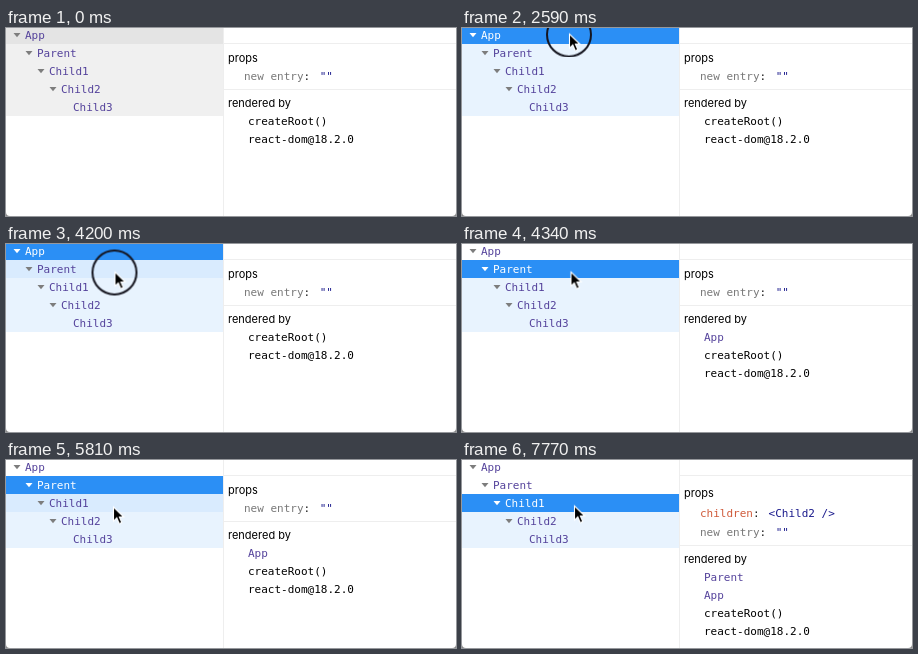
An HTML page for the animation above (8 s loop, 450x188 px).

```html
<!DOCTYPE html>
<html lang="en">
<head>
<meta charset="utf-8">
<title>Component tree inspector</title>
<style>
html, body { margin: 0; width: 100%; height: 100%; overflow: hidden; background: #888; }
svg { display: block; width: 100vw; height: 100vh; }
text { font: 11px "DejaVu Sans Mono", monospace; fill: #000; }
.title { font: 11px Inter, sans-serif; }
.name { fill: #54429b; }
.key { fill: #777; }
.prop { fill: #cf5a3a; }
.colon { fill: #222; }
.value { fill: #1a1a8c; }
.arrow { fill: #7d7d7d; }
.bar rect { fill: #2b8ff5; }
.bar text, .bar .arrow { fill: #fff; }
.line { fill: none; stroke: #eee; }

/* The small negative delay keeps step edges clear of frame boundaries. */
.idle, .sub, .hover, .bar, .panel, .ring, .cursor {
  animation: 8s step-end -10ms infinite;
}
.idle { animation-name: idle; }
.sub { fill: #e8f3fe; animation-name: sub; }
.hover { fill: #d9ebfe; animation-name: hover; }
.bar.app { animation-name: bar-app; }
.bar.parent { animation-name: bar-parent; }
.bar.child { animation-name: bar-child; }
.panel.app { animation-name: panel-app; }
.panel.parent { animation-name: panel-parent; }
.panel.child { animation-name: panel-child; }
.ring { fill: none; stroke: #15151f; stroke-width: 2; animation-name: ring; }
.cursor { animation-name: cursor; }

@keyframes idle { 0% { visibility: visible; } 14%, 100% { visibility: hidden; } }
@keyframes sub {
  0% { visibility: hidden; transform: translateY(0); }
  14% { visibility: visible; transform: translateY(0); }
  53.375% { visibility: visible; transform: translateY(18px); }
  78.75%, 100% { visibility: visible; transform: translateY(36px); }
}
@keyframes hover {
  0% { visibility: hidden; transform: translateY(0); }
  42.875% { visibility: visible; transform: translateY(0); }
  53.375% { visibility: hidden; transform: translateY(18px); }
  64.75% { visibility: visible; transform: translateY(18px); }
  78.75%, 100% { visibility: hidden; transform: translateY(18px); }
}
@keyframes bar-app {
  0% { visibility: hidden; } 14% { visibility: visible; } 53.375%, 100% { visibility: hidden; }
}
@keyframes bar-parent {
  0% { visibility: hidden; } 53.375% { visibility: visible; } 78.75%, 100% { visibility: hidden; }
}
@keyframes bar-child { 0% { visibility: hidden; } 78.75%, 100% { visibility: visible; } }
@keyframes panel-app { 0% { visibility: visible; } 53.375%, 100% { visibility: hidden; } }
@keyframes panel-parent {
  0% { visibility: hidden; } 53.375% { visibility: visible; } 80.5%, 100% { visibility: hidden; }
}
@keyframes panel-child { 0% { visibility: hidden; } 96.25%, 100% { visibility: visible; } }
@keyframes ring {
  0%, 14.875%, 34.125%, 54.25%, 79.625%, 100% { visibility: hidden; }
  14%, 32.375%, 52.5%, 77.875% { visibility: visible; }
}
@keyframes cursor {
  0% { transform: translate(83px, 200px); animation-timing-function: steps(4); }
  3.5% { transform: translate(88px, 110px); animation-timing-function: steps(4); }
  7% { transform: translate(106px, 25px); animation-timing-function: steps(3); }
  9.625% { transform: translate(109px, 6px); }
  11.375% { transform: translate(109px, 6px); animation-timing-function: steps(2); }
  13.125% { transform: translate(107px, 5.5px); }
  39.375% { transform: translate(107px, 5.5px); animation-timing-function: steps(4); }
  42.875% { transform: translate(107px, 17px); animation-timing-function: steps(4); }
  46.375% { transform: translate(107.5px, 30px); }
  47.25% { transform: translate(107.5px, 30px); animation-timing-function: steps(2); }
  49% { transform: translate(108.5px, 27.5px); }
  63% { transform: translate(108.5px, 27.5px); animation-timing-function: steps(5); }
  67.375% { transform: translate(106px, 48px); }
  70% { transform: translate(106px, 48px); animation-timing-function: steps(2); }
  71.75% { transform: translate(105.5px, 48px); }
  72.625% { transform: translate(107px, 46.5px); animation-timing-function: steps(2); }
  74.375%, 100% { transform: translate(112px, 45.5px); }
}
</style>
</head>
<body>
<svg viewBox="0 0 450 188">
  <defs>
    <path id="arrow" d="M7.5 5h7l-3.5 4.2z"/>
    <clipPath id="tree"><rect width="217" height="88"/></clipPath>
  </defs>
  <path fill="#fff" d="M0 0H450V184Q450 188 446 188H4Q0 188 0 184Z"/>

  <g clip-path="url(#tree)">
    <g class="idle">
      <rect width="217" height="88" fill="#f0f0f0"/>
      <rect width="217" height="16" fill="#e4e4e4"/>
    </g>
    <rect class="sub" y="16" width="217" height="90"/>
    <rect class="hover" y="16" width="217" height="18"/>

    <g class="arrow">
      <use href="#arrow"/>
      <use href="#arrow" x="12" y="18"/>
      <use href="#arrow" x="24" y="36"/>
      <use href="#arrow" x="36" y="54"/>
    </g>
    <text class="name" x="19" y="11">App</text>
    <text class="name" x="31" y="29">Parent</text>
    <text class="name" x="43" y="47">Child1</text>
    <text class="name" x="55" y="65">Child2</text>
    <text class="name" x="67" y="83">Child3</text>

    <g class="bar app">
      <rect y="-2" width="217" height="18"/>
      <use class="arrow" href="#arrow"/>
      <text x="19" y="11">App</text>
    </g>
    <g class="bar parent">
      <rect y="16" width="217" height="18"/>
      <use class="arrow" href="#arrow" x="12" y="18"/>
      <text x="31" y="29">Parent</text>
    </g>
    <g class="bar child">
      <rect y="34" width="217" height="18"/>
      <use class="arrow" href="#arrow" x="24" y="36"/>
      <text x="43" y="47">Child1</text>
    </g>
  </g>

  <path class="line" d="M217.5 0V188M218 15.5H450"/>

  <g class="panel app">
    <path class="line" d="M218 61.5H450"/>
    <text class="title" x="222" y="34">props</text>
    <text class="key" x="238" y="52">new entry<tspan class="colon">:</tspan><tspan class="value" dx="9.5">""</tspan></text>
    <text class="title" x="222" y="79">rendered by</text>
    <text x="242" y="97">createRoot()</text>
    <text x="242" y="115">react-dom@18.2.0</text>
  </g>

  <g class="panel parent">
    <path class="line" d="M218 61.5H450"/>
    <text class="title" x="222" y="34">props</text>
    <text class="key" x="238" y="52">new entry<tspan class="colon">:</tspan><tspan class="value" dx="9.5">""</tspan></text>
    <text class="title" x="222" y="79">rendered by</text>
    <text class="name" x="242" y="97">App</text>
    <text x="242" y="115">createRoot()</text>
    <text x="242" y="133">react-dom@18.2.0</text>
  </g>

  <g class="panel child">
    <path class="line" d="M218 85.5H450"/>
    <text class="title" x="222" y="37">props</text>
    <text class="prop" x="238" y="57">children<tspan class="colon">:</tspan><tspan class="value" dx="9">&lt;Child2 /&gt;</tspan></text>
    <text class="key" x="238" y="76">new entry<tspan class="colon">:</tspan><tspan class="value" dx="9.5">""</tspan></text>
    <text class="title" x="222" y="103">rendered by</text>
    <text class="name" x="242" y="121">Parent</text>
    <text class="name" x="242" y="139">App</text>
    <text x="242" y="157">createRoot()</text>
    <text x="242" y="175">react-dom@18.2.0</text>
  </g>

  <g class="cursor">
    <circle class="ring" cy="1" r="22"/>
    <path d="M.5 .5V14.6L3.8 11.5L6.3 17.2L8.8 16.1L6.4 10.5H10.8Z" stroke="#fff" stroke-width="1.1"/>
  </g>
</svg>
</body>
</html>
```
